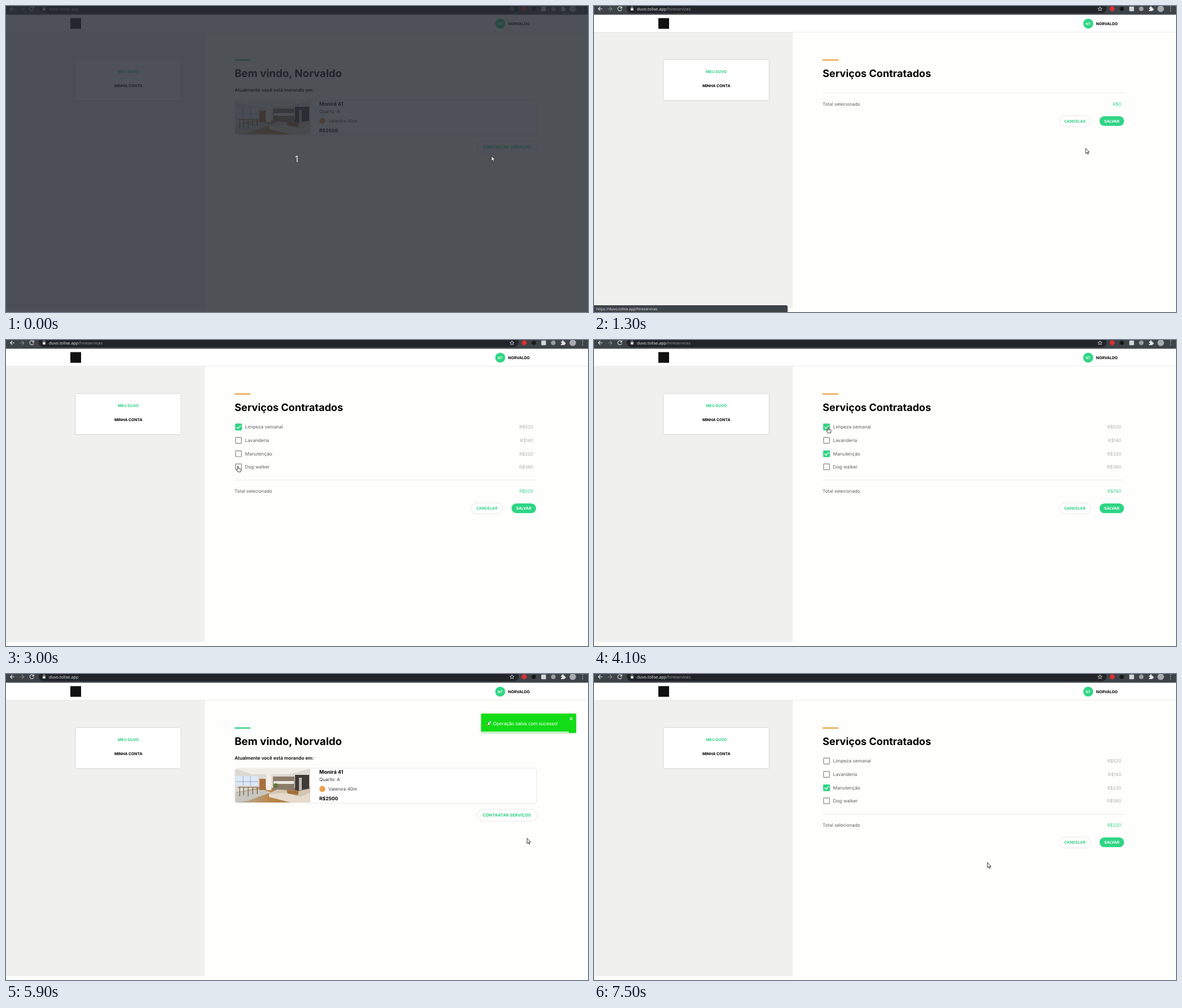
Animation, 1031 px wide and 543 px high, one loop 8000 ms. Source, as an HTML page:

```html
<!DOCTYPE html>
<html lang="pt-BR">
<head>
<meta charset="utf-8">
<title>Serviços</title>
<style>
  html, body { margin: 0; width: 100%; height: 100%; overflow: hidden; background: #fefefd; }
  svg { display: block; width: 100%; height: 100%; }
  text { font-family: Inter, "Open Sans", sans-serif; font-size: 8.2px; text-rendering: geometricPrecision; }
  .bold { font-weight: 700; }
  .caps { font-weight: 700; font-size: 6.8px; }
  .mid { text-anchor: middle; }
  .end { text-anchor: end; }
  .green { fill: #2fd083; }
  .grey { fill: #606060; }
  .price { fill: #adadad; font-size: 7.9px; }
  .chrome { font-family: "Open Sans", "Noto Sans", sans-serif; font-size: 7.3px; fill: #eceef0; }
  .raised { fill: #fff; filter: drop-shadow(0 .6px 1.6px rgba(0, 0, 0, .17)); }
  .line { fill: none; stroke: #e4e6e8; stroke-width: 1.1; }
</style>
</head>
<body>
<svg viewBox="0 0 1031 543" preserveAspectRatio="none">
  <defs>
    <clipPath id="photoClip"><path d="M410 168H539V228H410Q406 228 406 224V172Q406 168 410 168Z"/></clipPath>
    <linearGradient id="floor" x2="1"><stop stop-color="#b9b4a6"/><stop offset=".5" stop-color="#b98447"/><stop offset="1" stop-color="#a97a49"/></linearGradient>
  </defs>

  <!-- page frame -->
  <rect width="1031" height="543" fill="#fefefd"/>
  <rect y="46" width="352.5" height="490" fill="#f0f0ef"/>
  <rect y="15" width="1031" height="31" fill="#fff"/>
  <path d="M0 46.4H1031" stroke="#e9e9e8" stroke-width=".9"/>
  <rect x="114" y="21.5" width="19" height="19" fill="#111"/>
  <circle cx="875.5" cy="31.2" r="8.8" fill="#2fd585"/>
  <text class="mid" x="875.5" y="33.5" fill="#fff" style="font-size:6.4px;font-weight:600">NT</text>
  <text class="caps" x="889.5" y="33.9">NORVALDO</text>
  <rect class="raised" x="123.5" y="96" width="186" height="71" rx="1"/>
  <text class="caps mid green" x="216.7" y="119">MEU DUVO</text>
  <text class="caps mid" x="216.7" y="144.4">MINHA CONTA</text>

  <!-- browser bar -->
  <rect width="1031" height="15.3" fill="#3d4347"/>
  <path d="M0 14.8H1031" stroke="#4b5155"/>
  <rect x="58" y="-4" width="850" height="16.8" rx="8.4" fill="#212428"/>
  <path class="line" d="M15 5H8M11.2 1.5L7.7 5L11.2 8.5"/>
  <path class="line" d="M24.5 5H31.5M28.3 1.5L31.8 5L28.3 8.5" style="stroke:#83888c"/>
  <path class="line" d="M48.3 2.4A3.6 3.6 0 1 0 49.2 5.8M49.3 .8V3.6H46.5"/>
  <rect x="65" y="4" width="4.8" height="4" rx=".5" fill="#e4e6e8"/>
  <path class="line" d="M65.9 4V2.8A1.5 1.5 0 0 1 68.9 2.8V4" style="stroke-width:.8"/>
  <text class="chrome" x="76" y="7.5">duvo.tolise.app<tspan id="path" fill="#9ba0a5">/hireservices</tspan></text>
  <path class="line" style="stroke-width:.8" d="M896.3 1.4L897.4 4H900.1L898 5.8L898.7 8.5L896.3 7L893.9 8.5L894.6 5.8L892.5 4H895.2Z"/>
  <circle cx="918" cy="5" r="4.4" fill="#dc2f35"/>
  <circle cx="935" cy="5" r="3.8" fill="#17191b"/>
  <rect x="948.2" y="1" width="8.4" height="8.2" rx="1" fill="#d4d7d8"/>
  <circle cx="969.5" cy="5" r="4" fill="#9a9fa3"/>
  <path d="M983 2.7H985.2A1.4 1.4 0 1 1 987.8 2.7H989.6V4.6A1.4 1.4 0 1 1 989.6 7.2V9H983V7A1.3 1.3 0 1 0 983 4.6Z" fill="#e4e6e8"/>
  <circle cx="1004" cy="5" r="5.8" fill="#a9abb3"/>
  <path d="M1021.5 1.6V8.8" stroke="#e4e6e8" stroke-width="1.5" stroke-linecap="round" stroke-dasharray="0 3.4"/>

  <rect id="accent" x="405" y="94.7" width="28" height="2.3"/>

  <g id="home">
    <text class="bold" x="405" y="126" style="font-size:18.7px">Bem vindo, Norvaldo</text>
    <text x="405" y="152" style="font-weight:600">Atualmente você está morando em:</text>
    <rect class="raised" x="406" y="168" width="533.5" height="60.5" rx="4"/>
    <g clip-path="url(#photoClip)">
      <path fill="#ddd9d2" d="M406 168H539V228H406Z"/>
      <path fill="#f0ede7" d="M406 168H539L500 178H436Z"/>
      <path fill="url(#floor)" d="M406 210L448 202H539V228H406Z"/>
      <path fill="#c7c6c0" d="M406 211L450 204L470 210L428 225L406 228Z"/>
      <path fill="#dce9f6" d="M407 181H446V198H407Z"/>
      <path fill="none" stroke="#899ab3" stroke-width=".8" d="M420 181V198M433 181V198M407 191H446"/>
      <path fill="#a8713d" d="M449 186H460V206H449Z"/>
      <path fill="#f2efeb" d="M461 178H470V206H461Z"/>
      <path fill="#8d7b69" d="M473 182H511V206H473Z"/>
      <path fill="#ece7df" d="M474 190H510V195H474Z"/>
      <path fill="#403a37" d="M512 179H537V207H512Z"/>
      <path fill="#bbb8b4" d="M519 184H524V206H519Z"/>
      <circle cx="478" cy="198" r="4" fill="#64783d"/>
      <path fill="none" stroke="#6e5134" stroke-width="1.1" d="M411 201H449M414 201V217M421 201V215M429 201V217M437 201V214M445 201V213"/>
      <path fill="#d3c5b3" d="M466 212L480 205L520 207L539 203V228H505L466 218Z"/>
      <path fill="#e5dacb" d="M466 213L492 211L521 218L539 210V228H504L466 218Z"/>
      <path fill="#a26f38" d="M497 206L519 207L517 215L499 212Z"/>
    </g>
    <text class="bold" x="555" y="177.3" style="font-size:9px">Monirá 41</text>
    <text x="555" y="190.2" fill="#333">Quarto: A</text>
    <circle cx="560.4" cy="203.9" r="5.3" fill="#eba04e"/>
    <text x="571" y="206.9" fill="#444">Valenira 40m</text>
    <text class="bold" x="555" y="224.3" style="font-size:8.5px">R$2500</text>
    <rect class="raised" x="835" y="241" width="104.5" height="19" rx="9.5"/>
    <text class="bold mid green" x="887.2" y="253.3" style="font-size:7.4px">CONTRATAR SERVIÇOS</text>
  </g>

  <g id="services">
    <text class="bold" x="405" y="126" style="font-size:18.1px">Serviços Contratados</text>
    <g id="rows"></g>
    <g id="footer">
      <path d="M405 248.7H939.5" stroke="#ebebea" stroke-width=".9"/>
      <text class="grey" x="405" y="271" style="font-size:8px">Total selecionado</text>
      <text id="total" class="end green" x="934" y="271" style="font-size:7.9px"></text>
      <rect class="raised" x="825" y="290" width="54" height="17.5" rx="8.7"/>
      <text class="caps mid green" x="851.8" y="301.1">CANCELAR</text>
      <rect x="895.5" y="290" width="43.5" height="17.3" rx="8.6" fill="#2fd585"/>
      <text class="caps mid" x="917.2" y="301.1" fill="#fff">SALVAR</text>
    </g>
  </g>

  <g id="toast">
    <rect x="854" y="70.3" width="168.5" height="34.4" rx=".6" fill="#12dc16" style="filter:drop-shadow(0 .5px 2px rgba(0,0,0,.14))"/>
    <path d="M864.2 88.4L866.5 86.2L869.3 90L867.2 91.9Z" fill="#b5434c"/>
    <path d="M865.6 89.3Q867.2 84.4 871.8 83.6Q871.5 88 867.3 91Z" fill="#e6e8ee"/>
    <circle cx="869.2" cy="86.4" r=".9" fill="#46688c"/>
    <path d="M863.4 92.2L865.8 89.5L866.9 90.7Z" fill="#efad42"/>
    <text x="875" y="91" fill="#fff" style="font:8.6px 'Liberation Sans',sans-serif">Operação salva com sucesso!</text>
    <path d="M1011.3 76.9L1015.9 81.5M1015.9 76.9L1011.3 81.5" stroke="#e9fbe9" stroke-width="1.1"/>
    <rect id="progress" x="854" y="102" width="168.5" height="2.7" fill="#fff" opacity=".75"/>
  </g>

  <g id="status">
    <path d="M0 531H340Q343 531 343 534V543H0Z" fill="#3d4347"/>
    <text class="chrome" x="4" y="539.6" style="font-size:6.6px">https://duvo.tolise.app/hireservices</text>
  </g>

  <g id="countdown">
    <rect width="1031" height="543" fill="#282b33" opacity=".82"/>
    <text class="mid" x="515.3" y="277" fill="#fff" style="font:16px 'Open Sans',sans-serif">1</text>
  </g>

  <g id="cursor" fill="#fff" stroke="#222" stroke-width=".9" stroke-linejoin="round">
    <path id="arrow" d="M0 0V9.2L2.1 7.3L3.6 10.6L5.1 9.9L3.6 6.8H6.4Z"/>
    <path id="hand" d="M-1 .8Q0 -.6 1 .8V4L4.5 4.7Q5.6 5 5.3 6.5L4.6 10H-.2L-2.6 6.6Q-2.8 5.2 -1 6Z"/>
  </g>
</svg>

<script>
const LOOP = 8000, STEP = 100;
const $ = id => document.getElementById(id);
const show = (id, on) => { $(id).style.display = on ? '' : 'none'; };
const within = (t, spans) => spans.some(([from, to]) => t >= from && t < to);

const services = [
  { name: 'Limpeza semanal', price: 520, y: 154.4, on: [[0, 4200]] },
  { name: 'Lavanderia', price: 140, y: 178.1, on: [] },
  { name: 'Manutenção', price: 220, y: 201.8, on: [[3600, LOOP]] },
  { name: 'Dog walker', price: 390, y: 225, on: [[0, 3000]] }
];

$('rows').innerHTML = services.map(({ name, price, y }, i) => `
  <rect x="406.7" y="${y - 5.2}" width="10.4" height="10.4" rx=".8" fill="none" stroke="#868686" stroke-width="1.2"/>
  <g id="tick${i}">
    <rect x="406" y="${y - 5.9}" width="11.8" height="11.8" rx="1.2" fill="#2fd585"/>
    <path d="M408.3 ${y}l2.7 2.7l5 -5.2" fill="none" stroke="#fff" stroke-width="1.3"/>
  </g>
  <text class="grey" x="423.5" y="${y + 2.9}">${name}</text>
  <text class="price end" x="934" y="${y + 2.9}">R$${price}</text>`).join('');

// time, x, y of the pointer tip
const pointerPath = [
  [0, 860, 266], [300, 860, 266], [400, 864, 263], [700, 871, 252.5], [1800, 871, 252.5],
  [1900, 695, 262], [2000, 650, 253.5], [2100, 650, 253.5], [2200, 610, 254], [2300, 610, 254],
  [2600, 409, 235], [2700, 409, 235], [2900, 411, 224], [3100, 411, 224], [3400, 412, 201],
  [3600, 412, 201], [3700, 413, 186], [3800, 413, 186], [4100, 414.6, 155], [4300, 414.6, 155],
  [4700, 737, 322], [4900, 810, 346], [5300, 923, 291.5], [6300, 923, 291.5],
  [6900, 864.8, 253.3], [7200, 864.8, 253.3], [7500, 697, 334.5], [LOOP, 697, 334.5]
];
const handSpans = [[600, 1300], [2800, 4400], [6800, 7200]];
const servicesSpans = [[1300, 5600], [7200, LOOP]];
const loadingSpans = [[1300, 1400], [7200, 7300]];
const statusSpans = [[700, 1700], [7100, 7500]];
const fadingSpans = [[1600, 1700], [7400, 7500]];
const TOAST_START = 5510, TOAST_END = 7200, TOAST_LIFE = 5000, BOUNCE = 700;

function pointerAt(t) {
  const i = pointerPath.findIndex(([time]) => time > t);
  const [t0, x0, y0] = pointerPath[i - 1], [t1, x1, y1] = pointerPath[i];
  const k = (t - t0) / (t1 - t0);
  return [x0 + (x1 - x0) * k, y0 + (y1 - y0) * k];
}

function bounceIn(k) {
  const stops = [[0, 1600], [.6, -13], [.75, 5], [.9, -2.7], [1, 0]];
  const i = stops.findIndex(([at]) => at > k);
  if (i < 1) return 0;
  const [a, from] = stops[i - 1], [b, to] = stops[i];
  const eased = 1 - (1 - (k - a) / (b - a)) ** 3;
  return from + (to - from) * eased;
}

function draw(t) {
  const onServices = within(t, servicesSpans), loading = within(t, loadingSpans);
  show('home', !onServices);
  show('services', onServices);
  show('path', onServices);
  $('accent').setAttribute('fill', onServices ? '#e9a646' : '#2fd083');

  let total = 0;
  services.forEach(({ price, on }, i) => {
    const checked = within(t, on);
    show('tick' + i, checked);
    if (checked && !loading) total += price;
  });
  $('total').textContent = 'R$' + total;
  show('rows', !loading);
  $('footer').setAttribute('transform', `translate(0 ${loading ? -94.5 : 0})`);

  show('toast', t >= TOAST_START && t < TOAST_END);
  const age = Math.max(0, t - TOAST_START);
  $('toast').setAttribute('transform', `translate(${bounceIn(age / BOUNCE)} 0)`);
  $('progress').setAttribute('width', 168.5 * (1 - age / TOAST_LIFE));

  show('status', within(t, statusSpans));
  $('status').setAttribute('opacity', within(t, fadingSpans) ? .5 : 1);
  show('countdown', t < 400);

  const hand = within(t, handSpans);
  show('hand', hand);
  show('arrow', !hand);
  $('cursor').setAttribute('transform', `translate(${pointerAt(t)})`);
}

const start = performance.now();
function tick() {
  const t = (performance.now() - start) % LOOP;
  draw(Math.floor(t / STEP) * STEP);
  requestAnimationFrame(tick);
}
tick();
</script>
</body>
</html>
```
